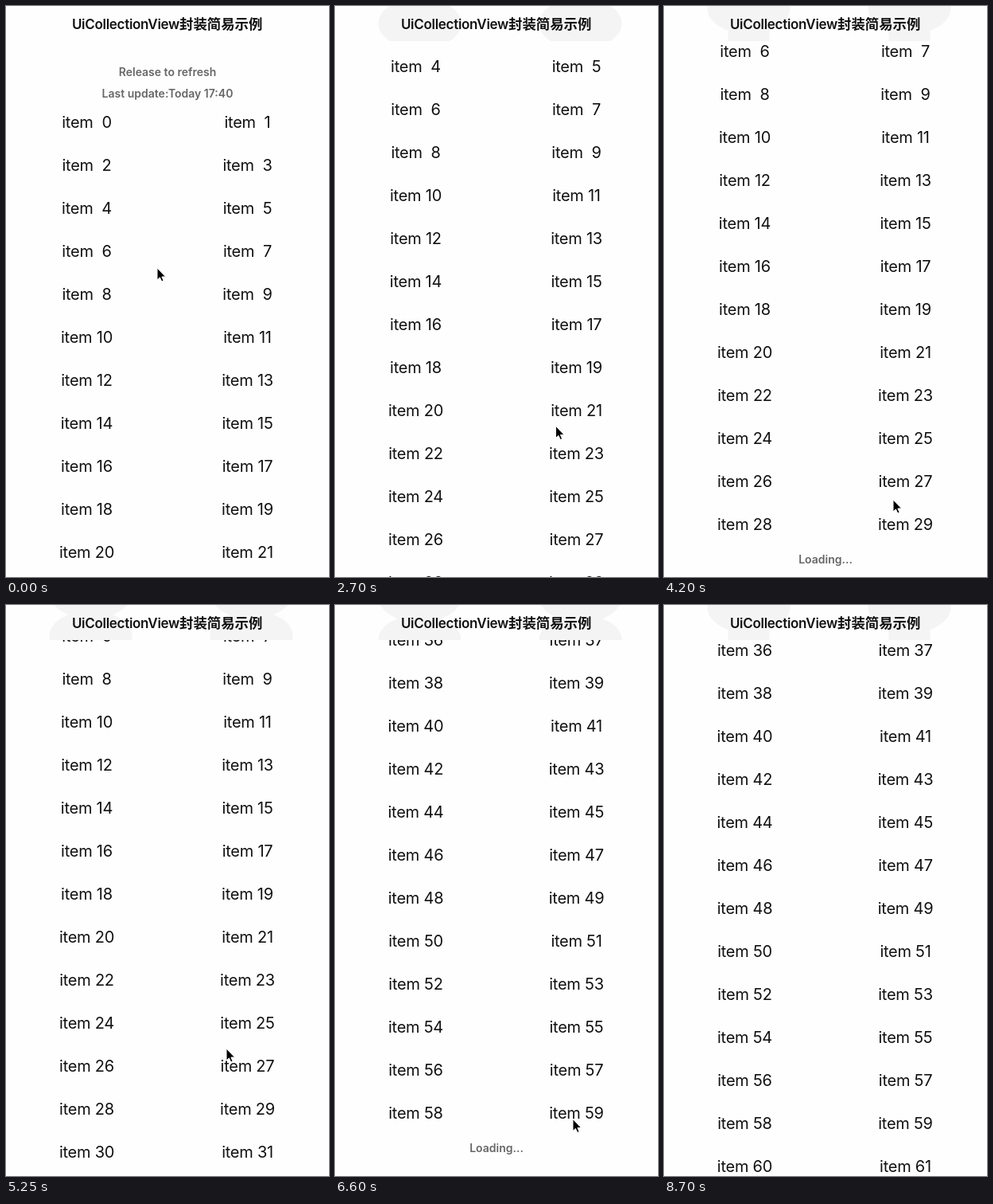
Animation, 406 px wide and 717 px high, one loop 9.15 s. Source, as an HTML page with a canvas:

```html
<!DOCTYPE html>
<html lang="zh">
<head>
<meta charset="utf-8">
<title>UiCollectionView封装简易示例</title>
<style>
html, body { margin: 0; width: 100%; height: 100%; overflow: hidden; background: #fefefe; }
canvas { display: block; }
</style>
</head>
<body>
<canvas id="stage" width="406" height="717"></canvas>
<script>
const ctx = document.getElementById('stage').getContext('2d');
const LOOP = 9150, STEP = 150, LAST = 8700;
const W = 406, H = 717, NAV = 44, ROW = 54, PAGE = 30, COLS = [101.5, 303.5];
const SANS = 'Inter, "Noto Sans CJK SC", "Noto Sans CJK", sans-serif';
const BG = '#fefefe', HAZE = '#f4f4f4', INK = '#111', GREY = '#666';
const RELEASED = 450, REFRESHED = 1500, LOADED = [4500, 7650];

// Content heights: pulled open, refreshing, at rest, and at the end of page n
const PULLED = 146, BUSY = 120, REST = 66;
const pageEnd = n => H - 22 - n * PAGE / 2 * ROW + 10;

const ease = p => p * p * (3 - 2 * p);

// Eases a value through successive moves [from time, to time, goal]
function follow(value, moves, t) {
  for (const [from, to, goal] of moves) {
    const p = Math.min(1, Math.max(0, (t - from) / (to - from)));
    value += (goal - value) * ease(p);
  }
  return value;
}

const scrolls = [
  [RELEASED, 750, BUSY], [REFRESHED, 1890, REST],
  [2400, 3000, pageEnd(1) - 25], [3000, 3900, pageEnd(1)],
  [5146, 6328, pageEnd(2) - 15], [6450, 6900, pageEnd(2) - 7], [7350, 8100, pageEnd(2)]
];

// Hand gestures: [from time, to time, x, y]
const gestures = [
  [0, 1050, 205, 365], [1350, 1650, 229, 414], [1650, 2250, 272, 620], [2400, 3000, 283, 435],
  [3450, 4200, 288, 620], [4500, 4950, 277, 586], [5100, 5250, 277, 557], [5250, 5550, 281, 380],
  [5550, 6000, 292, 642], [6150, 7350, 314, 653], [7350, 8250, 346, 672], [8250, 8700, 375, 735]
];
const pointerX = t => follow(190, gestures.map(([a, b, x]) => [a, b, x]), t);
const pointerY = t => follow(329, gestures.map(([a, b, , y]) => [a, b, y]), t);

function text(str, x, y, font, color, align = 'center', spacing = 0) {
  ctx.font = `${font} ${SANS}`;
  ctx.fillStyle = color;
  ctx.textAlign = align;
  ctx.letterSpacing = spacing + 'px';
  ctx.fillText(str, x, y);
}

const note = (str, y) => text(str, 203, y + 5, '600 14px', GREY);

function drawList(t, top) {
  const count = PAGE * (1 + LOADED.filter(time => t >= time).length);
  const state = t < RELEASED ? 'Release to refresh' : t < REFRESHED ? 'Loading...' : 'Pull down to refresh';
  note(state, top - 63);
  note('Last update:Today 17:4' + (t < REFRESHED ? 0 : 1), top - 36);
  for (let i = 0; i < count; i++) {
    const y = top + (i >> 1) * ROW;
    text('item ' + String(i).padStart(2), COLS[i % 2], y + 7, '400 20px', INK, 'center', -0.25);
  }
  note('Loading...', top + count / 2 * ROW - 10);
}

// Pale haze of the content passing beneath the translucent bar
function drawHaze(top) {
  ctx.fillStyle = HAZE;
  for (const y of [top - 63, top - 36])
    if (y < 50) ctx.fillRect(160, y - 6, 128, 12);
  for (const x of COLS) {
    if (top < NAV) ctx.fillRect(x - 21, top - 27, 52, NAV - top + 27);
    for (let y = top; y < 48; y += ROW) {
      ctx.beginPath();
      ctx.ellipse(x + 5, y, 52, 32, 0, 0, 7);
      ctx.fill();
    }
  }
}

function drawBar(top) {
  ctx.save();
  ctx.beginPath();
  ctx.rect(0, 0, W, NAV);
  ctx.clip();
  ctx.fillStyle = BG;
  ctx.fillRect(0, 0, W, NAV);
  drawHaze(top);
  ctx.restore();
  text('UiCollectionView', 218, 29, '600 17px', INK, 'right', -0.3);
  text('封装简易示例', 218, 29, '600 17.4px', INK, 'left');
}

const arrow = new Path2D('M0 0V15L3.4 11.9L5.7 17L8.1 16L5.9 11H10.6Z');

function drawPointer(x, y) {
  ctx.save();
  ctx.translate(x, y);
  ctx.fillStyle = '#000';
  ctx.fill(arrow);
  ctx.strokeStyle = '#fff';
  ctx.stroke(arrow);
  ctx.restore();
}

function frame() {
  const t = Math.min(LAST, Math.floor(performance.now() % LOOP / STEP) * STEP);
  const top = Math.round(follow(PULLED, scrolls, t));
  ctx.fillStyle = BG;
  ctx.fillRect(0, 0, W, H);
  drawList(t, top);
  drawBar(top);
  drawPointer(pointerX(t), pointerY(t));
  requestAnimationFrame(frame);
}
frame();
</script>
</body>
</html>
```
